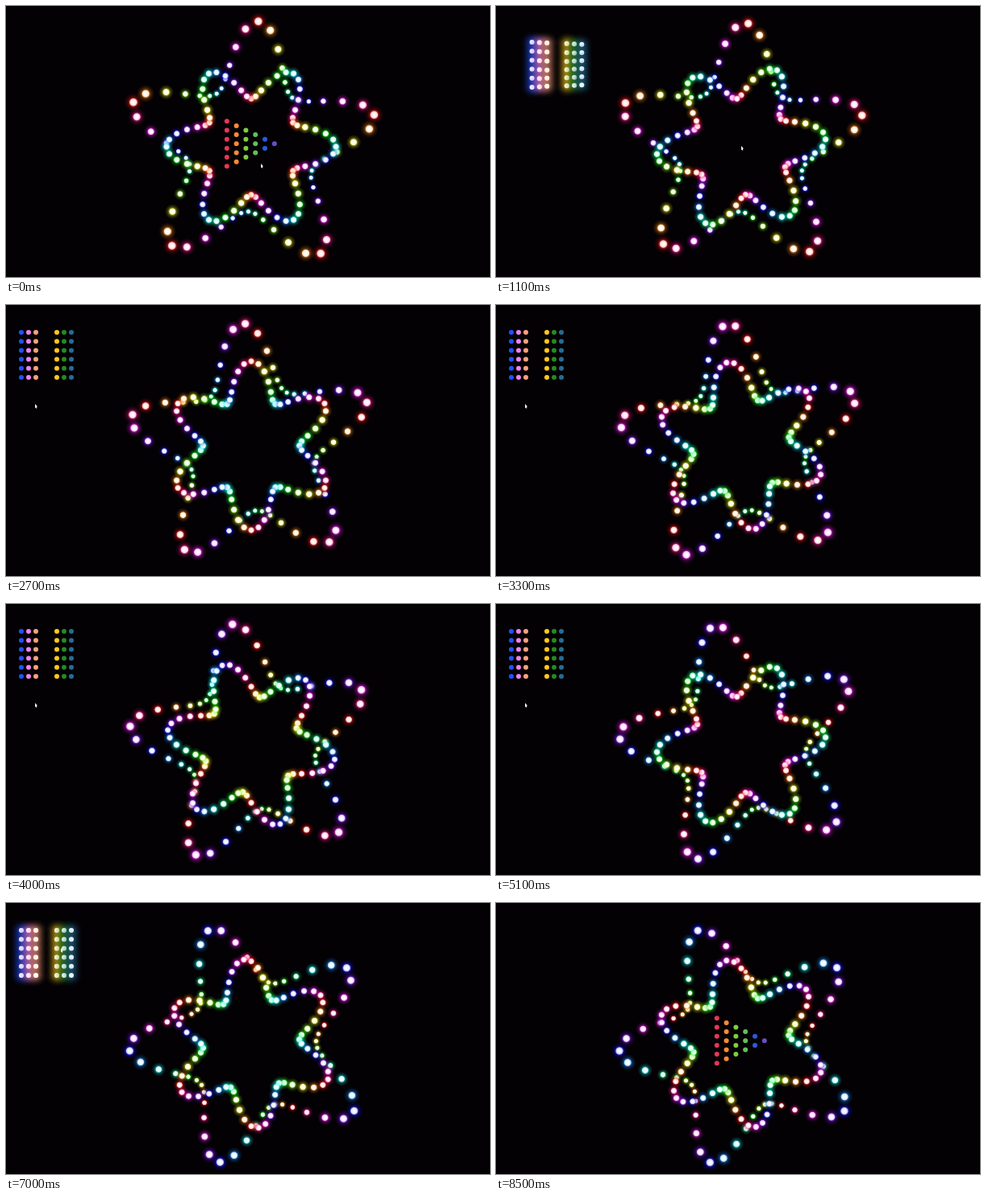
An HTML page with a canvas for the animation above (8.6 s loop, 600 px wide and 337 px high).

```html
<!DOCTYPE html>
<html lang="en">
<head>
<meta charset="utf-8">
<title>Dot stars</title>
<style>
  html, body { margin: 0; width: 100%; height: 100%; overflow: hidden; background: #030104; }
  canvas { display: block; width: 600px; height: 337px; }
</style>
</head>
<body>
<canvas id="stage"></canvas>
<script>
const LOOP = 8600, STEP = 100, W = 600, H = 337, RAD = Math.PI / 180;
const canvas = document.getElementById('stage');
const ctx = canvas.getContext('2d');
const scale = window.devicePixelRatio || 1;
canvas.width = W * scale;
canvas.height = H * scale;
ctx.scale(scale, scale);

const PLAY_COLORS = ['#e83658', '#ff8a33', '#7fcc40', '#62c05a', '#2a5be0', '#684ec8'];
const PAUSE_COLORS = ['#2450ff', '#ee82ee', '#ffa07a', '#ffc81e', '#228b22', '#246c96'];

const clamp = (v, max) => Math.min(max, Math.max(0, v));
const lerp = (a, b, p) => a + (b - a) * p;

function smooth(t, start, end) {
  const p = clamp((t - start) / (end - start), 1);
  return p * p * (3 - 2 * p);
}

function disc(x, y, r, fill, alpha = 1) {
  ctx.globalAlpha = alpha;
  ctx.fillStyle = fill;
  ctx.beginPath();
  ctx.arc(x, y, r, 0, 2 * Math.PI);
  ctx.fill();
  ctx.globalAlpha = 1;
}

function glowDot(x, y, r, hue) {
  const outer = r * 2.4;
  const g = ctx.createRadialGradient(x, y, 0, x, y, outer);
  const stop = (at, light, alpha) => g.addColorStop(at, `hsla(${hue},95%,${light}%,${alpha})`);
  stop(0, 100, 1);
  stop(0.28, 96, 1);
  stop(0.38, 82, 1);
  stop(0.46, 58, 0.5);
  stop(0.65, 50, 0.2);
  stop(1, 50, 0);
  disc(x, y, outer, g);
}

// Dots keep their angle and hue; only their distance changes.
function ring(cx, cy, count, offset, shape) {
  for (let k = 0; k < count; k++) {
    const angle = k * 360 / count + offset;
    const [dist, size] = shape(angle);
    glowDot(cx + dist * Math.sin(angle * RAD), cy - dist * Math.cos(angle * RAD), size, k * 30 % 360);
  }
}

function drawStars(t) {
  const turn = clamp((t - 700) * 0.015, 100);
  // The outer ring is a wave seen in perspective.
  const near = 1 / (151.7 + 5.4 * Math.exp(-t / 2200)), far = 1 / 79.8;
  ring(304.6, 176, 60, 3, angle => {
    const wave = Math.cos(5 * (angle - 3 + turn * 0.24) * RAD);
    const dist = 1 / ((near + far) / 2 - (far - near) / 2 * wave);
    return [dist, dist * 0.031];
  });
  ring(304, 175, 72, 0, angle => [82.4 + 22.6 * Math.cos(6 * (angle - 30 + turn) * RAD), 3.6]);
}

function drawHalo(x, y, color, strength) {
  const r = 14;
  const g = ctx.createRadialGradient(x, y, 0, x, y, r);
  [0.75, 0.5, 0.24, 0.07, 0].forEach((alpha, i) => {
    const hex = Math.round(alpha * 255).toString(16).padStart(2, '0');
    g.addColorStop(i / 4, color + hex);
  });
  disc(x, y, r, g, strength);
}

// A triangle of dots slides to the corner and unfolds into two bars.
function drawButton(t) {
  const p = smooth(t, 650, 1210) - smooth(t, 7400, 7980);
  const glow = smooth(t, 400, 650) - smooth(t, 1150, 1500)
    + smooth(t, 6500, 6800) - smooth(t, 7600, 8100);
  const colors = p > 0.5 ? PAUSE_COLORS : PLAY_COLORS;
  const cx = lerp(303.3, 50, p), cy = lerp(171.3, 62, p);
  for (let col = 0; col < 6; col++) {
    const last = 5 - col;
    const barX = (col - 2.5) * 9 + (col < 3 ? -8.5 : 8.5);
    const x = cx + lerp((col - 2.5) * 11.8, barX, p);
    const rows = p > 0 ? 6 : last + 1;
    for (let row = 0; row < rows; row++) {
      const y = cy + 11.2 * lerp(Math.min(row, last) - last / 2, row - 2.5, p);
      if (glow > 0) drawHalo(x, y, colors[col], glow);
      disc(x, y, 3, colors[col]);
      disc(x, y, 3, '#fff', 0.92 * glow);
    }
  }
}

function drawPointer(t) {
  if (t >= 8000) return;
  const click = smooth(t, 0, 500), leave = smooth(t, 1200, 2100), hover = smooth(t, 6300, 6800);
  const x = 316 - 12 * click - 268 * leave + 32 * hover;
  const y = 196 - 22 * click - 51 * leave - 67 * hover;
  ctx.fillStyle = '#eee';
  ctx.fill(new Path2D(`M${x} ${y}l3.2 3.6h-1.3l.4 1.8h-.9l-1.4-.8z`));
}

function draw(t) {
  ctx.fillStyle = '#030104';
  ctx.fillRect(0, 0, W, H);
  drawStars(t);
  drawButton(t);
  drawPointer(t);
}

const start = performance.now();
function tick() {
  const t = (performance.now() - start) % LOOP;
  draw(Math.floor(t / STEP) * STEP);
  requestAnimationFrame(tick);
}
tick();
</script>
</body>
</html>
```
